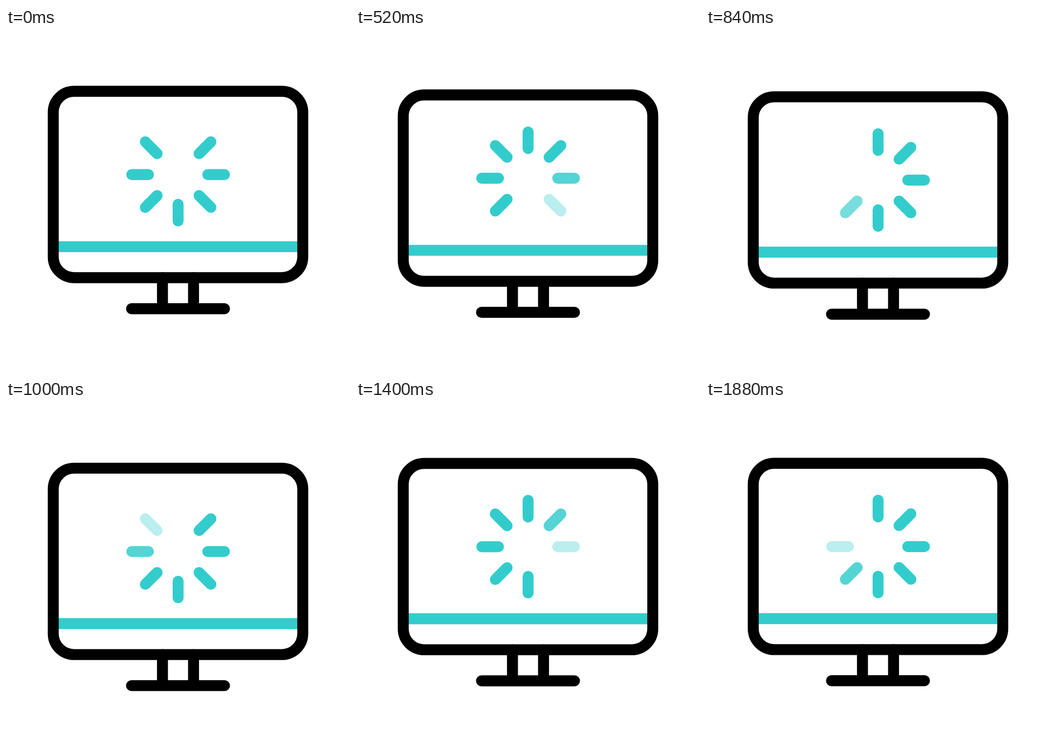
Animation of 640 by 640 pixels, one loop 1920 ms. Source, as an HTML page:

```html
<!DOCTYPE html>
<html lang="en">
<head>
<meta charset="utf-8">
<title>Loading monitor</title>
<style>
  html, body { margin: 0; height: 100%; overflow: hidden; background: #fff; }
  svg { display: block; width: 100%; height: 100%; }
</style>
</head>
<body>
<svg viewBox="0 0 640 640" fill="none" stroke="#000" stroke-width="20.4" stroke-linecap="round">
  <g id="monitor">
    <path d="M98 406.8H542" stroke="#3cc" stroke-linecap="butt"/>
    <g id="spinner" stroke="#3cc" transform="translate(320.2 272.7)"></g>
    <rect x="87.9" y="117.7" width="464.2" height="346.7" rx="38.8"/>
    <path d="M291.1 464.4V522.2M348.9 464.4V522.2M233.5 522.2H406.5"/>
  </g>
</svg>
<script>
const LOOP = 1920, STEP = 40, BARS = 8, TURN = 24;
const monitor = document.getElementById('monitor');
const spinner = document.getElementById('spinner');

const bars = Array.from({ length: BARS }, (_, i) => {
  const bar = document.createElementNS('http://www.w3.org/2000/svg', 'path');
  bar.setAttribute('d', 'M0 -55.2V-86.2');
  bar.setAttribute('transform', `rotate(${i * 360 / BARS})`);
  return spinner.appendChild(bar);
});

// Smooth dip: down, short rest, back up
const dip = tick => 10.4 / (1 + Math.exp(0.57 * (Math.abs(tick - 20.2) - 8.36)));

// Each bar vanishes in turn, then fades back in; the second turn runs one tick late after its first bar
function opacity(i, tick) {
  const first = 3 * i;
  const second = first + TURN + (i > 0);
  const age = tick - (tick >= second ? second : first);
  if (age < 0 || age >= 8) return 1;
  return age < 4 ? 0 : (age - 2) / 6;
}

function draw(now) {
  const tick = Math.max(2, Math.floor(now % LOOP / STEP));
  monitor.setAttribute('transform', `translate(0 ${dip(tick).toFixed(2)})`);
  bars.forEach((bar, i) => bar.setAttribute('opacity', opacity(i, tick)));
}

const start = performance.now();
function loop() {
  draw(performance.now() - start);
  requestAnimationFrame(loop);
}
loop();
</script>
</body>
</html>
```
